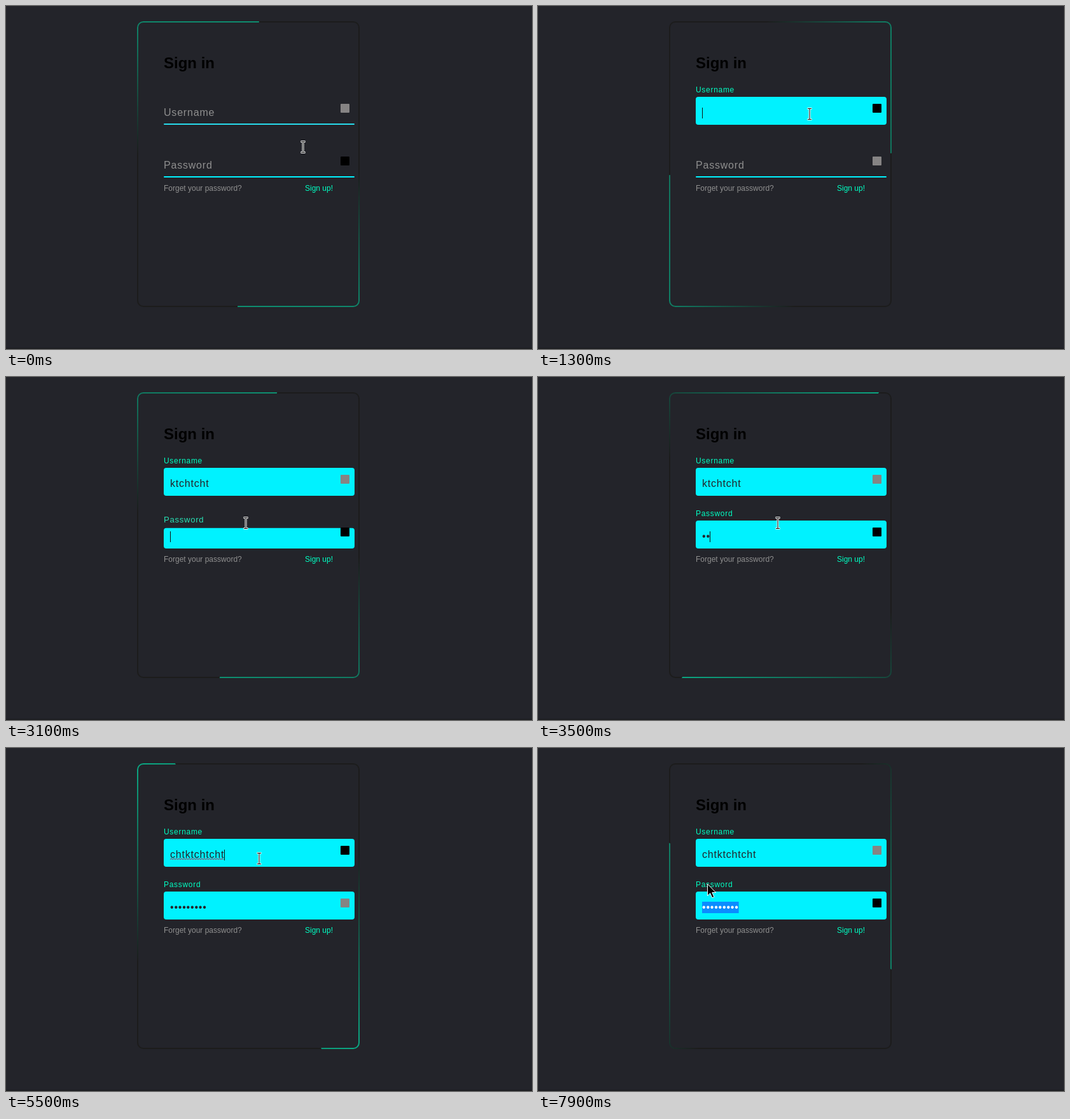
Recreate the animation shown at these times as an HTML page. Size 827x540 px, loop 8000 ms.

```html
<!DOCTYPE html>
<html lang="en">
<head>
<meta charset="utf-8">
<title>Sign in form</title>
<style>
html, body { margin: 0; width: 100%; height: 100%; overflow: hidden; background: #23242a; }
svg { display: block; font: 12px "Liberation Sans", Arial, sans-serif; }
.value { font-size: 16px; letter-spacing: .8px; fill: #23242a; }
</style>
</head>
<body>
<svg width="827" height="540">
  <defs>
    <linearGradient id="glow" x1="0" y1="1" x2="0" y2="0">
      <stop stop-color="#00ffc3" stop-opacity="0"/>
      <stop offset="1" stop-color="#00ffc3"/>
    </linearGradient>
    <clipPath id="card"><rect x="206" y="24" width="350" height="450" rx="10"/></clipPath>
  </defs>
  <rect y="538" width="827" height="2" fill="#1d1e22"/>
  <g clip-path="url(#card)">
    <rect x="206" y="24" width="350" height="450" fill="#1c1c1c"/>
    <g id="spin" fill="url(#glow)">
      <rect x="-350" y="-450" width="350" height="450"/>
      <rect x="-350" y="-450" width="350" height="450" transform="rotate(180)"/>
    </g>
  </g>
  <rect x="208" y="26" width="346" height="446" rx="8" fill="#23242a"/>
  <text x="248" y="98" font-size="24" font-weight="bold">Sign in</text>
  <g id="fields"></g>
  <text x="248" y="291" fill="#8f8f8f">Forget your password?</text>
  <text x="470" y="291" fill="#00ffc3">Sign up!</text>
  <g id="pointer">
    <g id="beam" fill="none">
      <path d="M-3.5-8.5H3.5M0-8.5V8.5M-3.5 8.5H3.5" stroke="#fff" stroke-width="3"/>
      <path d="M-3-8.5H3M0-8.5V8.5M-3 8.5H3" stroke="#000"/>
    </g>
    <path id="arrow" d="M0 0V18.5L4.2 14.7L7.3 21.8L10.4 20.4L7.3 13.5H13Z" fill="#000" stroke="#fff"/>
  </g>
</svg>
<script>
const $ = id => document.getElementById(id);
const clamp = (v, a, b) => Math.min(b, Math.max(a, v));
const mix = (a, b, p) => a + (b - a) * p;
const ease = p => 1 - (1 - clamp(p, 0, 1)) ** 2.5;
const LOOP = 8000, LEFT = 258;

function add(tag, attrs, parent) {
  const el = document.createElementNS("http://www.w3.org/2000/svg", tag);
  set(el, attrs);
  return parent.appendChild(el);
}
function set(el, attrs) {
  for (const k in attrs) el.setAttribute(k, attrs[k]);
}
const show = (el, on) => set(el, { visibility: on ? "visible" : "hidden" });

// keys: [time, value, value...]
function track(keys, t) {
  let i = 1;
  while (i < keys.length - 1 && t > keys[i][0]) i++;
  const [a, b] = [keys[i - 1], keys[i]];
  const p = clamp((t - a[0]) / (b[0] - a[0]), 0, 1);
  return a.slice(1).map((v, k) => mix(v, b[k + 1], p));
}

const turn = [[0, 4.3], [1300, 84.4], [2400, 150.7], [3500, 214.6],
  [5500, 332.9], [6900, 418.8], [7900, 479.7]];
const mouse = [[0, 467, 222], [700, 430, 172], [1300, 427, 170], [2400, 384, 170],
  [2600, 384, 170], [2900, 377, 230], [4200, 377, 230], [4600, 262, 170],
  [5000, 262, 170], [5400, 398, 174], [5700, 398, 174], [6300, 414, 244],
  [7100, 414, 244], [7500, 112, 250], [7900, 266.5, 214]];

class Field {
  constructor(label, bottom, opens) {
    const g = $("fields");
    this.bottom = bottom;
    this.opens = opens;
    this.bar = add("rect", { x: 248, width: 300 }, g);
    this.label = add("text", { x: 248 }, g);
    this.label.textContent = label;
    this.select = add("rect", { y: bottom - 28, height: 18, fill: "#0a8cff" }, g);
    this.text = add("text", { x: LEFT, y: bottom - 14, class: "value" }, g);
    this.wave = add("path", { d: `M${LEFT} ${bottom - 11.5}` + "l2-1.5l2 1.5".repeat(21),
      fill: "none", stroke: "#c0203c" }, g);
    this.caret = add("rect", { y: bottom - 27, width: 1, height: 17, fill: "#111" }, g);
    this.icon = add("rect", { x: 526, y: bottom - 33, width: 14, height: 14, rx: 1 }, g);
  }
  draw(t, { value, at = value.length, focus, hover, wavy, from = 0 }) {
    const p = ease((t - this.opens) / 500), h = mix(2, 44, p);
    const dull = this.bottom < 200 && p === 0;
    set(this.bar, { y: this.bottom - h, height: h, rx: Math.min(4, h / 2),
      fill: dull ? "#28dcec" : "#00f2ff" });
    set(this.label, { y: mix(this.bottom - 14, this.bottom - 51, p),
      "font-size": mix(16, 12, p), "letter-spacing": mix(.8, .7, p),
      fill: `rgb(${mix(143, 0, p)},${mix(143, 255, p)},${mix(143, 195, p)})` });
    this.text.textContent = value;
    const end = LEFT + (value ? this.text.getComputedTextLength() : 0);
    const start = from ? clamp(from, LEFT, end) : end;
    set(this.select, { x: start, width: end - start });
    this.text.style.fill = start < (LEFT + end) / 2 ? "#fff" : "";
    set(this.caret, { x: Math.floor(LEFT + (at ? this.text.getSubStringLength(0, at) : 0)) });
    const blink = t % 1000 >= 100 && t % 1000 < 600;
    show(this.caret, focus && blink && start === end);
    show(this.wave, wavy);
    set(this.icon, { fill: hover ? "#000" : "#868484" });
  }
}

const user = new Field("Username", 187, 750);
const pass = new Field("Password", 270, 2900);

function draw(t) {
  set($("spin"), { transform: `translate(381 249) rotate(${track(turn, t)[0]})` });

  const [x, y] = track(mouse, t);
  const typed = t < 2400 ? (t - 1800) / 150 : 4 + (t - 2400) / 100;
  const extra = clamp(Math.floor((t - 4800) / 100), 0, 3);
  const value = "cht".slice(0, extra) + "ktchtcht".slice(0, clamp(Math.floor(typed), 0, 8));
  const onUser = (t >= 750 && t < 2900) || (t >= 4600 && t < 6300);
  user.draw(t, {
    value,
    at: t >= 4600 && t < 5400 ? extra : value.length,
    focus: onUser,
    hover: (t >= 500 && t < 2800) || (t >= 4500 && t < 6100),
    wavy: t >= 5300 && t < 6300
  });
  pass.draw(t, {
    value: "•".repeat(clamp(Math.floor((t - 3300) / 100), 0, 9)),
    focus: t >= 2900 && !onUser,
    hover: t < 500 || (t >= 2800 && t < 4500) || t >= 6100,
    wavy: false,
    from: t < 7100 ? 0 : t < 7500 ? x : LEFT
  });

  const arrow = x < 248 || t >= 7600;
  set($("pointer"), { transform: `translate(${x} ${y})` });
  show($("arrow"), arrow);
  show($("beam"), !arrow);
}

const begin = performance.now();
function tick() {
  const t = (performance.now() - begin) % LOOP;
  draw(Math.floor(t / 100) * 100);
  requestAnimationFrame(tick);
}
tick();
</script>
</body>
</html>
```
